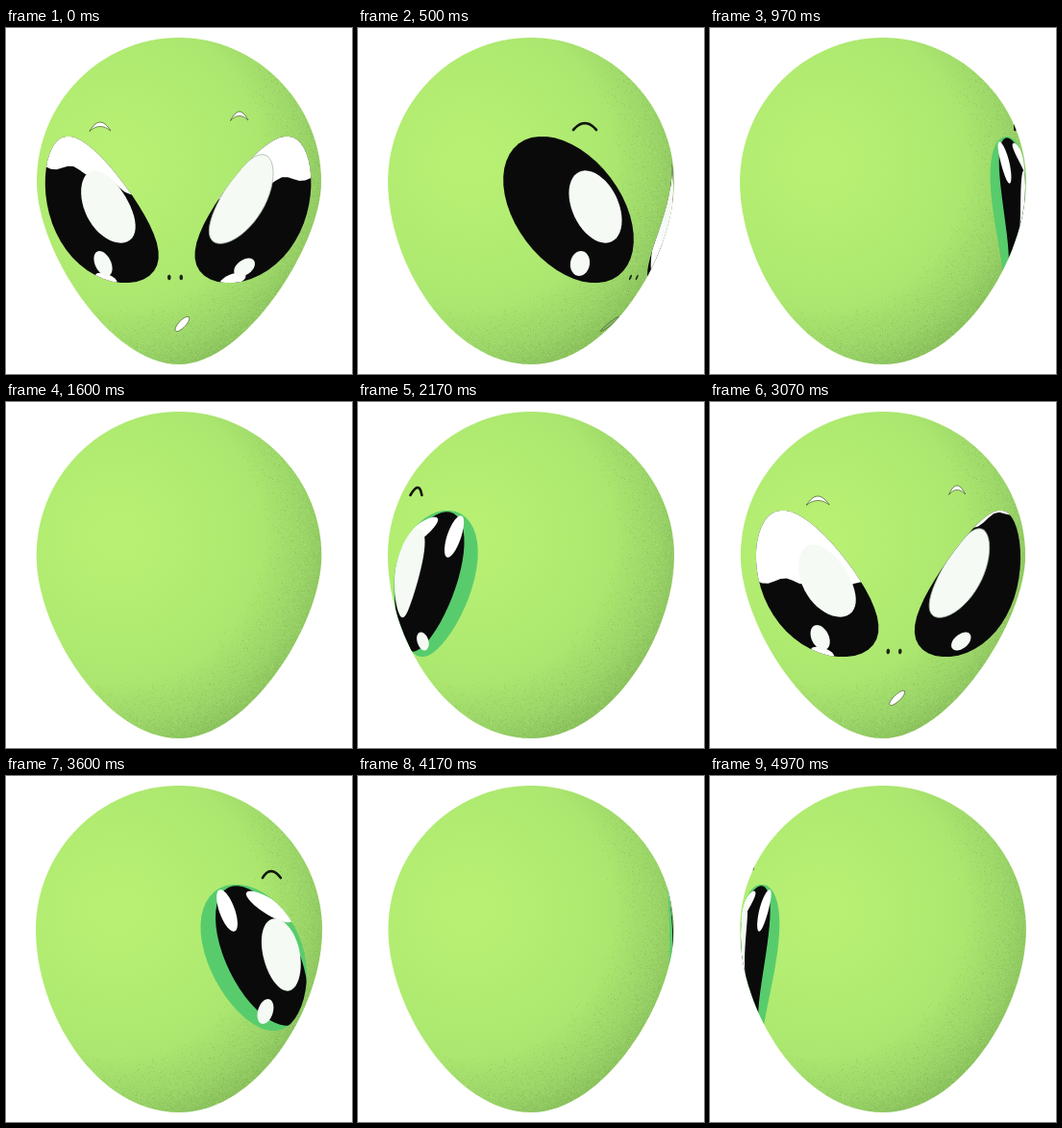
These frames come from a looping animation (360x360 px, 5070 ms). An HTML page with a canvas:

```html
<!DOCTYPE html>
<html lang="en">
<head>
<meta charset="utf-8">
<title>Turning alien head</title>
<style>
  html, body { margin: 0; width: 100%; height: 100%; overflow: hidden; background: #fff; }
  canvas { display: block; width: 360px; height: 360px; }
</style>
</head>
<body>
<canvas id="stage" width="360" height="360"></canvas>
<script>
const ctx = document.getElementById('stage').getContext('2d');
const LOOP = 5070, CX = 180, RAD = Math.PI / 180;
const INK = '#0a0a0b', RIM = '#58cc6c', WHITE = '#fff', SHINE = '#f5faf5';

// Key poses: step number and head turn in degrees.
const POSES = [[0, -1], [6, 58], [32, 319], [38, 366], [45, 438], [62, 604]];

const clamp = (v, a, b) => Math.min(b, Math.max(a, v));
const wrap = a => a - 360 * Math.round(a / 360);

// 12.5 steps per second, shown on a 30 Hz clock.
function stepAt(time) {
  const tick = Math.floor((time % LOOP + 4) * 0.03);
  return Math.min(62, Math.floor(tick * 5 / 12));
}

function turnAt(step) {
  const i = Math.max(1, POSES.findIndex(p => p[0] >= step));
  const [s0, a0] = POSES[i - 1], [s1, a1] = POSES[i];
  return wrap(a0 + (a1 - a0) * (step - s0) / (s1 - s0));
}

// Radius of the head's surface at a given height.
const radius = y => 148 * Math.sqrt(Math.max(0.01, 1 - ((y - 165) / 185) ** 2));

// Screen points, as seen at the given turn, to [longitude, y].
const lift = (turn, pts) => pts.map(([x, y]) =>
  [Math.asin(clamp((x - CX) / radius(y), -1, 1)) / RAD - turn, y]);

// Tilted ellipse on the surface, laid out as seen at the given turn.
function oval(turn, x, y, a, b, tilt = 0) {
  const c = Math.cos(tilt * RAD), s = Math.sin(tilt * RAD);
  return lift(turn, Array.from({ length: 48 }, (_, i) => {
    const u = a * Math.cos(i * Math.PI / 24), v = b * Math.sin(i * Math.PI / 24);
    return [x + u * c - v * s, y + u * s + v * c];
  }));
}

// Parabolic arch from left to right.
const arch = (x, y, w, h) => Array.from({ length: 13 }, (_, i) => {
  const u = i / 6 - 1;
  return [x + w * u, y - h * (1 - u * u)];
});

const mirror = pts => pts.map(([a, y]) => [-a, y]);
const middle = pts => pts.reduce((sum, p) => sum + p[0], 0) / pts.length;
const mix = (p, q, t) => p.map(([a, y], i) => [a + (q[i][0] - a) * t, y + (q[i][1] - y) * t]);

function project(pts, turn) {
  const c = middle(pts), off = wrap(c + turn) - c;
  if (!pts.some(p => Math.abs(p[0] + off) < 88)) return null;
  return pts.map(([a, y]) => [CX + radius(y) * Math.sin(clamp(a + off, -90, 90) * RAD), y]);
}

function trace(pts, closed = true) {
  const path = new Path2D();
  pts.forEach(p => path.lineTo(...p));
  if (closed) path.closePath();
  return path;
}

function paint(pts, turn, fill, line, width = 1) {
  const p = project(pts, turn);
  if (!p) return;
  const path = trace(p, Boolean(fill));
  if (fill) { ctx.fillStyle = fill; ctx.fill(path); }
  if (line) { ctx.strokeStyle = line; ctx.lineWidth = width; ctx.stroke(path); }
}

const isFront = d => Math.abs(d) < 20;
const outline = oval(58, 219, 189, 86, 55, 53);
const pupil = oval(78, 266, 187, 79, 37, 64);
const glare = [oval(78, 230, 140, 23, 8, 70), oval(78, 274, 136, 28, 8, 32)];

const eyes = [
  {
    side: -1, outline, pupil, glare,
    shine: oval(58, 247, 186, 40, 24, 65),
    spot: oval(58, 231, 245, 13, 10, 100),
    glints: [{ pts: oval(0, 106, 261, 12, 5, 20), when: isFront }]
  },
  {
    side: 1, outline: mirror(outline), pupil: mirror(pupil), glare: glare.map(mirror),
    shine: oval(-41, 149, 178, 53, 24, -57),
    spot: oval(-41, 160, 249, 12, 9, -20),
    glints: [
      { pts: oval(0, 238, 262, 14, 6, -20), when: d => isFront(d) && d < 4 },
      { pts: oval(-41, 203, 121, 9, 5, -15), when: d => d < -20 && d > -70 },
      { pts: oval(-41, 229, 121, 7, 4, 20), when: d => d < -20 && d > -70 },
      { pts: oval(58, 318, 210, 48, 8, 103), when: d => d > 40 }
    ]
  }
];

const brows = [
  { front: [100, 107, 11, 9], arc: lift(58, arch(236, 106, 12, 7)) },
  { front: [245, 96, 9, 9], arc: lift(-41, arch(155, 97, 12, 8)) }
].map(({ front: [x, y, w, h], arc }) =>
  ({ arc, crescent: lift(0, [...arch(x, y, w, h), ...arch(x, y, w, h / 2).reverse()]) }));

const nostrils = [172, 184.5].map(x => oval(0, x, 259.5, 1.8, 2.8));
const mouth = oval(0, 185, 308, 10, 3.6, -46);

// Shaded skin with fine grain towards the lower right.
const skin = document.createElement('canvas');
skin.width = skin.height = 360;
(() => {
  const g = skin.getContext('2d'), x0 = 115, y0 = 140, size = 245;
  const grad = g.createRadialGradient(x0, y0, 15, x0, y0, size);
  ['#b8f073', '#b4ee72', '#b0eb71', '#abe66f', '#9ad468', '#7fb455']
    .forEach((c, i) => grad.addColorStop(i / 5, c));
  g.fillStyle = grad;
  g.fillRect(0, 0, 360, 360);
  let seed = 7;
  const rand = () => (seed = seed * 16807 % 2147483647) / 2147483647;
  for (let i = 0; i < 45000; i++) {
    const x = rand() * 360, y = rand() * 360;
    const depth = Math.hypot(x - x0, y - y0) / size;
    const light = rand() < 0.5;
    if (x + y < 300 || rand() > (depth - 0.6) * 3) continue;
    g.fillStyle = light ? 'rgba(190,240,130,.22)' : 'rgba(105,165,70,.22)';
    g.fillRect(Math.floor(x), Math.floor(y), 1, 1);
  }
})();

// Tapered from the front and back, fuller from the side.
function headPath(turn) {
  const full = Math.abs(Math.sin(turn * RAD));
  const w = 148 + full, low = 226 + 15 * full, chin = 68 + 15 * full;
  const p = new Path2D();
  p.moveTo(CX, 10);
  p.bezierCurveTo(CX + 80, 10, CX + w, 78, CX + w, 160);
  p.bezierCurveTo(CX + w, low, CX + chin, 350, CX, 350);
  p.bezierCurveTo(CX - chin - 4, 350, CX - w, low + 5, CX - w, 160);
  p.bezierCurveTo(CX - w, 78, CX - 82, 10, CX, 10);
  return p;
}

// Reflected light fills the top of the eye and sinks towards the nose.
function drawCap(eye, edge, d) {
  const xs = edge.map(p => p[0]), lo = Math.min(...xs), hi = Math.max(...xs);
  const [outer, inner] = eye.side < 0 ? [lo, hi] : [hi, lo];
  const level = 150 - eye.side * 6 * d;
  const pts = [[inner, 90], [outer, 90]];
  for (let u = 0; u <= 1; u += 0.05) {
    pts.push([outer + (inner - outer) * u, level + (192 - level) * u * u + 3 * Math.sin(u * 20)]);
  }
  ctx.fillStyle = WHITE;
  ctx.fill(trace(pts));
}

function drawEye(eye, d) {
  const edge = project(eye.outline, d);
  if (!edge) return;
  // The socket wall shows when the eye is seen from its outer side.
  const outward = -eye.side * wrap(middle(eye.outline) + d);
  const wall = clamp((outward - 20) / 16, 0, 1);
  const shape = trace(edge);
  ctx.fillStyle = wall ? RIM : INK;
  ctx.fill(shape);
  ctx.save();
  ctx.clip(shape);
  if (wall) {
    paint(mix(eye.outline, eye.pupil, wall), d, INK);
    eye.glare.forEach(g => paint(g, d, WHITE));
  }
  if (isFront(d)) drawCap(eye, edge, d);
  eye.glints.filter(g => g.when(d)).forEach(g => paint(g.pts, d, WHITE));
  paint(eye.shine, d, SHINE, isFront(d) && eye.side > 0 ? '#a9b8a4' : null, 0.8);
  paint(eye.spot, d, SHINE);
  ctx.restore();
}

function draw(time) {
  const d = turnAt(stepAt(time));
  ctx.fillStyle = WHITE;
  ctx.fillRect(0, 0, 360, 360);
  ctx.save();
  ctx.clip(headPath(d));
  ctx.drawImage(skin, 0, 0);
  ctx.lineCap = ctx.lineJoin = 'round';
  eyes.forEach(e => drawEye(e, d));
  for (const b of brows) {
    if (isFront(d)) paint(b.crescent, d, WHITE, '#3a5222', 0.7);
    else paint(b.arc, d, null, '#10160c', 2.6);
  }
  nostrils.forEach(n => paint(n, d, '#1c2614'));
  paint(mouth, d, Math.abs(d) < 50 ? WHITE : '#86b964', '#3f5726', 0.7);
  ctx.restore();
}

const begin = performance.now();
function loop() {
  draw(performance.now() - begin);
  requestAnimationFrame(loop);
}
loop();
</script>
</body>
</html>
```
